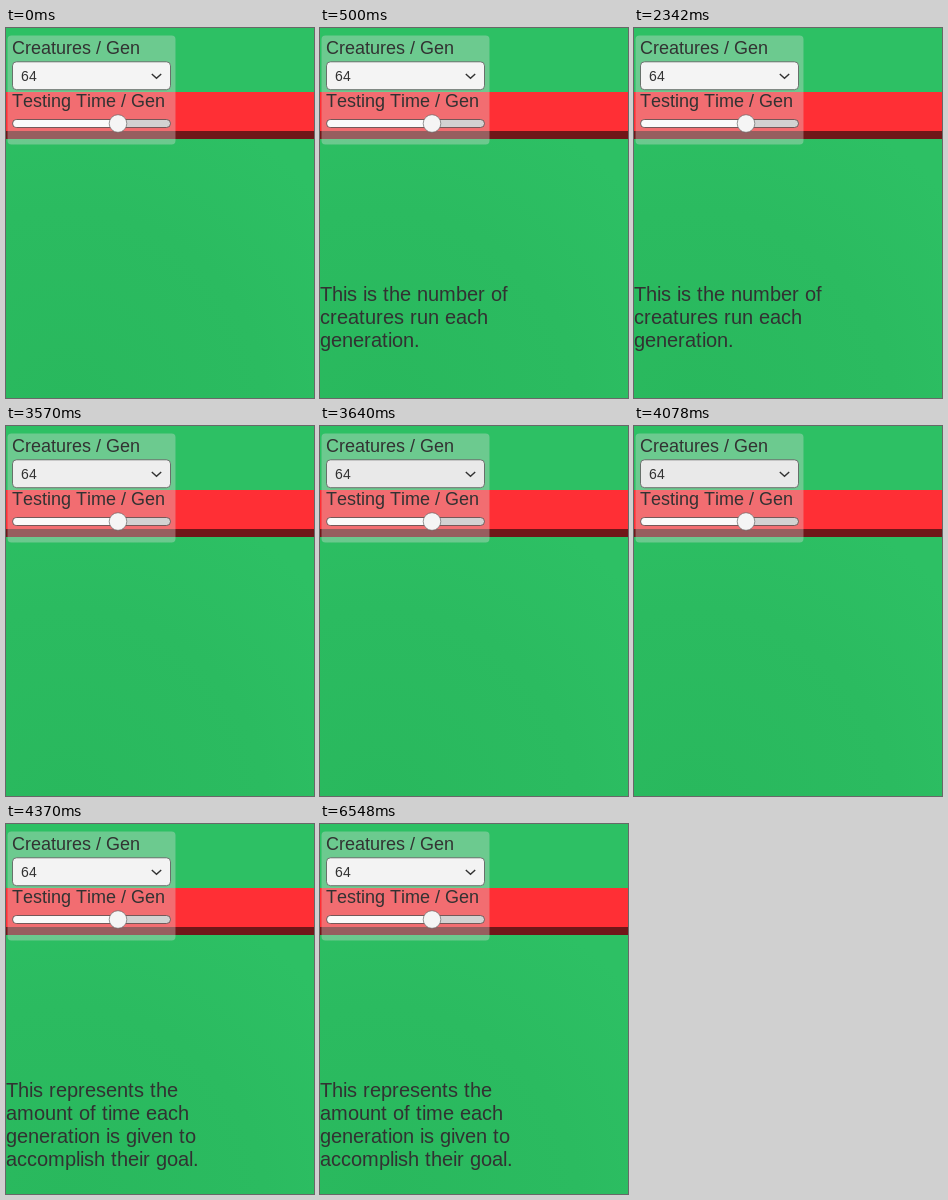
Write an HTML page that moves like this. It is 308 by 370 pixels and loops after 8000 ms.

```html
<!DOCTYPE html>
<html lang="en">
<head>
<meta charset="utf-8">
<title>Generation settings</title>
<style>
  html, body { margin: 0; width: 100%; height: 100%; overflow: hidden; background: #2cbe62; }
  svg { display: block; width: 308px; height: 370px; }
  text { font-family: "Liberation Sans", Arial, sans-serif; font-kerning: none; fill: #323232; }
  .label { font-size: 18px; }
  .value { font-size: 14px; }
  .tip { font-size: 20px; }
</style>
</head>
<body>
<svg viewBox="0 0 308 370">
  <defs>
    <radialGradient id="ground" gradientUnits="userSpaceOnUse" cx="60" cy="380" r="330">
      <stop offset="0" stop-color="#29b85d"/>
      <stop offset=".6" stop-color="#2bbb60"/>
      <stop offset="1" stop-color="#2dc064"/>
    </radialGradient>
  </defs>
  <rect width="308" height="370" fill="url(#ground)"/>
  <rect y="64" width="308" height="39" fill="#ff2f35"/>
  <rect y="103" width="308" height="8" fill="#701719"/>

  <rect x="1.5" y="7.5" width="168" height="109" rx="4" fill="#dcdcdc" fill-opacity=".36"/>
  <text class="label" x="6" y="26.4">Creatures / Gen</text>
  <text class="label" x="6" y="79">Testing Time / Gen</text>

  <rect id="select" x="6.5" y="33.8" width="158" height="27.9" rx="4" stroke="#555" stroke-opacity=".8"/>
  <text class="value" x="15" y="53">64</text>
  <path d="M145.8 45.9l4.7 4.3 4.7-4.3" fill="none" stroke="#323232" stroke-width="1.4"/>

  <rect x="6.5" y="91.5" width="158" height="8" rx="4" fill="#d2d2d2" stroke="#5a4747" stroke-opacity=".8"/>
  <path d="M11 92h101v7h-101a3.5 3.5 0 0 1 0-7z" fill="#fafafa"/>
  <circle cx="112" cy="95.5" r="8.8" fill="#f5f5f5" stroke="#666" stroke-opacity=".75" stroke-width=".9"/>

  <g id="tips"></g>
</svg>
<script>
const LOOP = 8000;
const root = document.getElementById("tips");
const select = document.getElementById("select");
const tips = [
  { from: 500, to: 3570, lines: ["This is the number of", "creatures run each", "generation."] },
  { from: 4370, to: LOOP, lines: ["This represents the", "amount of time each", "generation is given to", "accomplish their goal."] }
];
// Grey level of the select box from each time on.
const shades = [[0, 244], [3570, 238], [3640, 233], [4370, 243]];

const groups = tips.map(({ lines }) => {
  const g = document.createElementNS(root.namespaceURI, "g");
  lines.forEach((line, i) => {
    const text = document.createElementNS(root.namespaceURI, "text");
    text.setAttribute("class", "tip");
    text.setAttribute("x", 0);
    text.setAttribute("y", 273 + 23 * i);
    text.textContent = line;
    g.append(text);
  });
  root.append(g);
  return g;
});

// Advance every letter by whole pixels, as hinted bitmap text does.
function snapLetters(text) {
  let x = Number(text.getAttribute("x"));
  const xs = [...text.textContent].map((_, i) => {
    const at = x;
    x += Math.round(text.getSubStringLength(i, 1));
    return at;
  });
  text.setAttribute("x", xs.join(" "));
}
document.querySelectorAll("text").forEach(snapLetters);

function draw(t) {
  tips.forEach(({ from, to }, i) => {
    groups[i].setAttribute("visibility", t >= from && t < to ? "visible" : "hidden");
  });
  const [, v] = shades.filter(([from]) => t >= from).pop();
  select.setAttribute("fill", `rgb(${v},${v},${v})`);
}

const start = performance.now();
function tick() {
  draw((performance.now() - start) % LOOP);
  requestAnimationFrame(tick);
}
tick();
</script>
</body>
</html>
```
